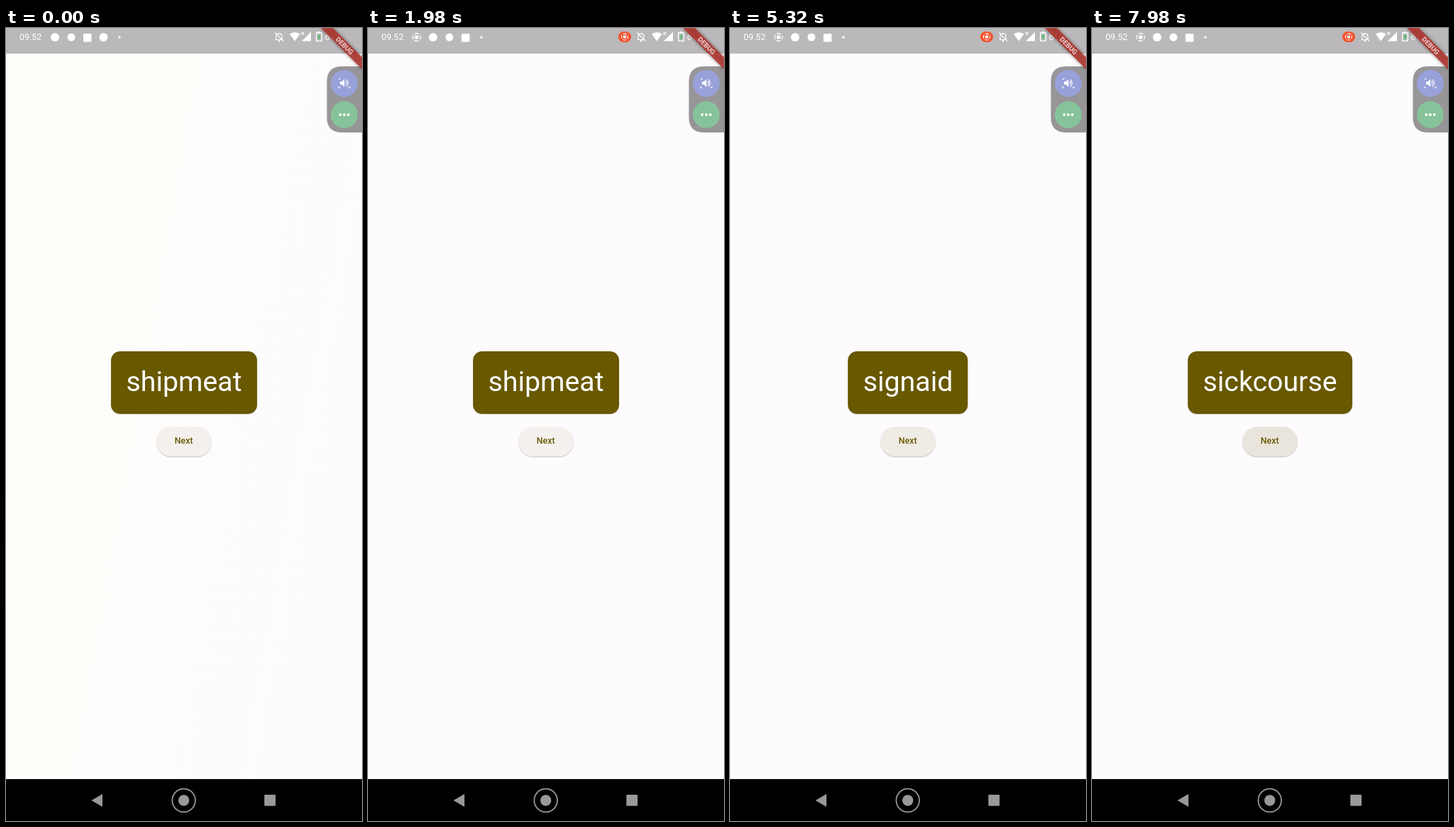
These frames come from a looping animation (502 by 1116 pixels, 8 s). An HTML page:

```html
<!DOCTYPE html>
<html lang="en">
<head>
<meta charset="utf-8">
<title>Word pairs</title>
<style>
  :root { --olive: #685800; --loop: 8s linear infinite; }
  html, body { margin: 0; width: 100%; height: 100%; overflow: hidden; background: #fdfbfd; }
  body { position: relative; font-family: Roboto, sans-serif; }
  svg { position: absolute; left: 0; top: 0; }

  .tint {
    position: absolute; inset: 36px 0 59px;
    background: linear-gradient(100deg, #fefef9 0 15%, #fdfbfe 85%);
    animation: tint var(--loop);
  }
  @keyframes tint { 0%, 1.5% { opacity: 1 } 6.75%, 100% { opacity: 0 } }

  .card {
    position: absolute; left: 251px; top: 455px; transform: translateX(-50%);
    padding: 21.4px; border-radius: 12.8px;
    background: var(--olive); color: #fff;
    font-size: 39.3px; line-height: 45px; white-space: nowrap;
    box-shadow: 0 1px 1px rgba(0, 0, 0, .2);
    visibility: hidden; animation: 8s step-end infinite;
  }
  .w1 { animation-name: w1 }
  .w2 { animation-name: w2 }
  .w3 { animation-name: w3 }
  .w4 { animation-name: w4 }
  .w5 { animation-name: w5 }
  @keyframes w1 { 0% { visibility: visible } 45.75%, 100% { visibility: hidden } }
  @keyframes w2 { 45.75% { visibility: visible } 52.5%, 100% { visibility: hidden } }
  @keyframes w3 { 52.5% { visibility: visible } 73.5%, 100% { visibility: hidden } }
  @keyframes w4 { 73.5% { visibility: visible } 92.5%, 100% { visibility: hidden } }
  @keyframes w5 { 92.5%, 100% { visibility: visible } }

  .next, .next i { position: absolute; border-radius: 21px; }
  .next {
    left: 212px; top: 561px; width: 77.5px; height: 41.8px;
    background: #f4f0ed; color: var(--olive);
    font: 500 12.3px/41.8px Roboto, sans-serif; letter-spacing: .1px; text-align: center;
    box-shadow: 0 1px 1px rgba(0, 0, 0, .22);
  }
  .next i { inset: 0; background: var(--olive); opacity: 0; animation: press var(--loop); }
  .next span { position: relative; }
  @keyframes press {
    0%, 48.75% { opacity: 0 }
    50% { opacity: .12 }
    52.5% { opacity: .1 }
    54%, 55.75% { opacity: .21 }
    58% { opacity: .12 }
    66.5% { opacity: .03 }
    71.75%, 73.5% { opacity: 0 }
    74.75% { opacity: .14 }
    77.5% { opacity: .13 }
    80.75% { opacity: .07 }
    86% { opacity: .035 }
    89.5%, 92.5% { opacity: 0 }
    93.75% { opacity: .14 }
    96.5% { opacity: .13 }
    99.75%, 100% { opacity: .07 }
  }

  .shift { animation: shift var(--loop); }
  .leave { animation: leave var(--loop); }
  .enter { animation: enter var(--loop); }
  @keyframes shift {
    0%, 15.75% { transform: none; animation-timing-function: ease-out }
    20.5%, 100% { transform: translateX(22.8px) }
  }
  @keyframes leave { 0%, 15.75% { opacity: 1 } 18%, 100% { opacity: 0 } }
  @keyframes enter { 0%, 16.5% { opacity: 0 } 20.5%, 100% { opacity: 1 } }
</style>
</head>
<body>
<div class="tint"></div>

<div class="card w1">shipmeat</div>
<div class="card w2">strengthbeauty</div>
<div class="card w3">signaid</div>
<div class="card w4">steakjazz</div>
<div class="card w5">sickcourse</div>
<div class="next"><i></i><span>Next</span></div>

<svg width="502" height="1116" viewBox="0 0 502 1116" font-family="Roboto, sans-serif">
  <defs>
    <filter id="soft" x="-20%" y="-100%" width="140%" height="300%"><feGaussianBlur stdDeviation="2.5"/></filter>
  </defs>

  <!-- status bar -->
  <rect width="502" height="36" fill="#bab8ba"/>
  <g fill="#fff">
    <text x="19" y="17.4" font-size="12.4">09.52</text>
    <g class="shift">
      <circle cx="69" cy="13" r="6"/>
      <circle cx="92" cy="13" r="5.5"/>
      <rect x="109" y="8" width="11.5" height="11.5" rx="1"/>
    </g>
    <circle class="leave" cx="137.5" cy="13" r="6"/>
    <circle cx="160" cy="13" r="1.7"/>
    <g class="enter">
      <circle cx="68.5" cy="13" r="2.8"/>
      <circle cx="68.5" cy="13" r="5.5" fill="none" stroke="#fff" stroke-width="1.3" stroke-dasharray="6.64 2" stroke-dashoffset="3.3"/>
    </g>
    <g class="enter">
      <rect x="353" y="5" width="18" height="15" rx="7.5" fill="#f8502c"/>
      <circle cx="362" cy="12.5" r="2.3"/>
      <circle cx="362" cy="12.5" r="4.6" fill="none" stroke="#fff" stroke-width="1.1" stroke-dasharray="5.6 1.63" stroke-dashoffset="2.8"/>
    </g>
    <!-- muted bell -->
    <path d="M381 16.5V11.5Q381 8 385 7.6Q389 8 389 11.5V16.5ZM379.5 16.5H390.5M379.5 6.5L391 18.5" fill="none" stroke="#fff" stroke-width="1.2"/>
    <circle cx="385" cy="18.2" r="1.2"/>
    <!-- signal -->
    <path d="M400 8.6Q407.3 3.2 414.6 8.6L407.3 18.4Z"/>
    <path d="M417 18.4L430 5.6V18.4Z"/>
    <path d="M416.4 5.6L420.4 9.6M420.4 5.6L416.4 9.6" stroke="#fff" stroke-width="1.1"/>
    <!-- battery -->
    <path d="M439.5 5H443.5V6.3H446V19H437V6.3H439.5Z"/>
    <rect x="438.3" y="7.6" width="6.4" height="10.1" fill="#bab8ba"/>
    <path d="M442.3 8L439 13.3H441.2L440.6 17.3L444.2 11.8H441.9Z" fill="#3fbf63"/>
    <text x="449.7" y="17.4" font-size="12.4">61%</text>
  </g>

  <!-- floating panel -->
  <path d="M502 54H474Q452.5 54 452.5 75V126Q452.5 147 474 147H502Z" fill="#979597"/>
  <circle cx="477" cy="78" r="19" fill="#99a1da"/>
  <circle cx="477" cy="122" r="19" fill="#86c39a"/>
  <g fill="#fff">
    <path d="M471 75.5H473.6L477.2 72V83L473.6 79.5H471Z"/>
    <path d="M479 74.6Q481 77.5 479 80.4M480.3 72.3Q484.3 77.5 480.3 82.7M470 73V71.2H471.8M469 82V84H471M485 82V84H483" fill="none" stroke="#fff" stroke-width="1.1"/>
    <circle cx="471.3" cy="122" r="1.9"/>
    <circle cx="477" cy="122" r="1.9"/>
    <circle cx="482.7" cy="122" r="1.9"/>
  </g>

  <!-- corner ribbon -->
  <path d="M444 0H461L502 41V58Z" opacity=".45" filter="url(#soft)"/>
  <path d="M444 0H461L502 41V58Z" fill="#b5302a" fill-opacity=".82"/>
  <text transform="translate(477.5 25) rotate(45)" y="3.3" text-anchor="middle" font-size="9.6" font-weight="700" fill="#fff" fill-opacity=".78">DEBUG</text>

  <!-- navigation bar -->
  <rect y="1057" width="502" height="59"/>
  <g fill="#999">
    <path d="M120.5 1087L136 1078V1096Z"/>
    <circle cx="250.7" cy="1087" r="16.3" fill="none" stroke="#999" stroke-width="1.8"/>
    <circle cx="250.7" cy="1087" r="7.7"/>
    <rect x="364.3" y="1079" width="15.8" height="15.8" rx="1.2"/>
  </g>
</svg>
</body>
</html>
```
